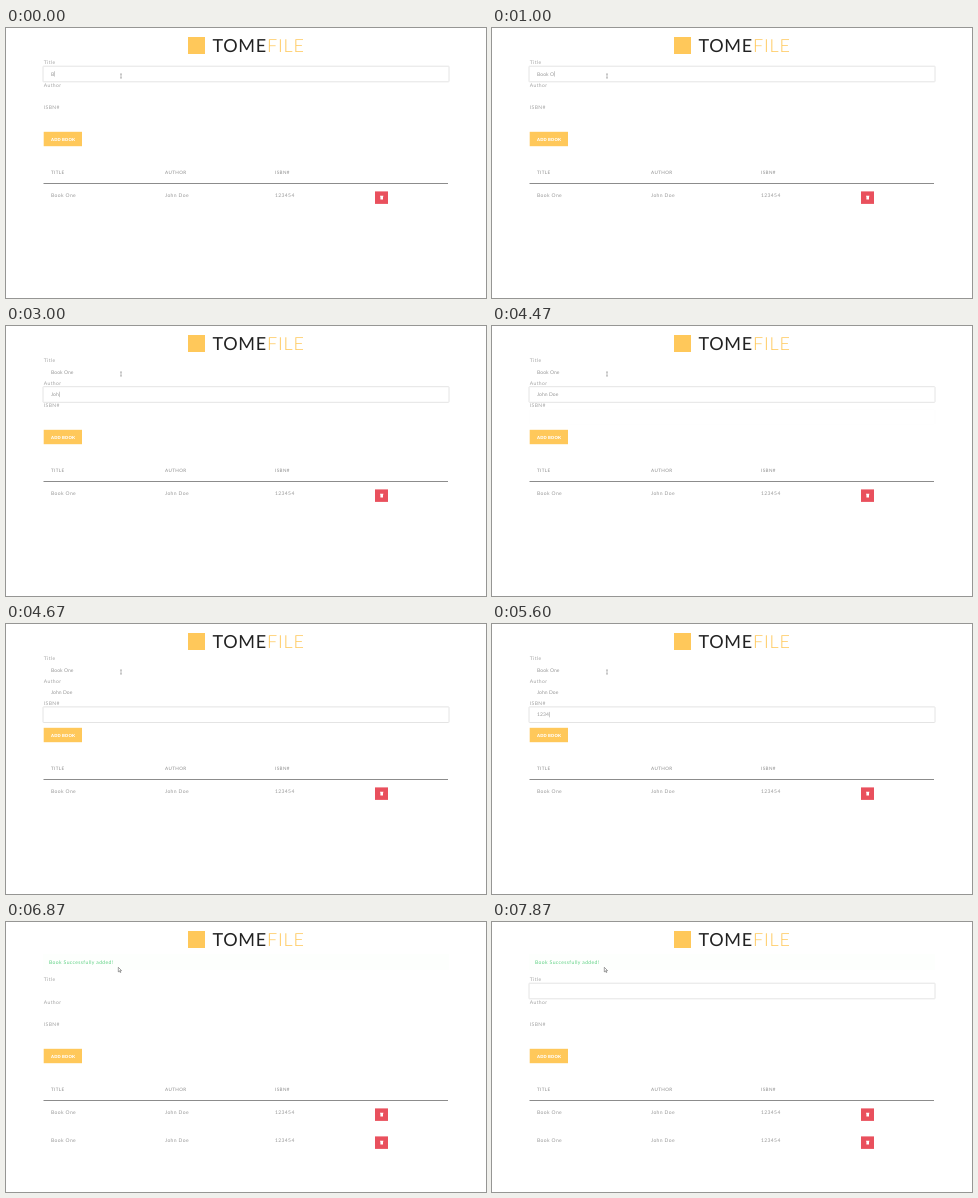
These frames come from a looping animation (480 by 270 pixels, 8000 ms). An HTML page:

```html
<!DOCTYPE html>
<html lang="en">
<head>
<meta charset="utf-8">
<title>Reading list form</title>
<style>
  html, body { margin: 0; width: 100%; height: 100%; overflow: hidden; background: #fff; }
  svg { display: block; width: 100vw; height: 100vh; }
  text {
    font: 400 5px Lato, "Open Sans", sans-serif;
    letter-spacing: .38px;
    fill: #989898;
    text-rendering: geometricPrecision;
    white-space: pre;
  }
  .brand { font-size: 18px; letter-spacing: .7px; fill: #222; }
  .brand tspan { font-weight: 300; letter-spacing: .9px; }
  .brand tspan, .amber { fill: #ffc85a; }
  .label { fill: #a2a2a2; }
  .value { letter-spacing: .06px; }
  .head { font-size: 4.6px; fill: #8c8c8c; }
  .action { font-size: 4.2px; font-weight: 900; letter-spacing: .15px; fill: #fff; }
  .notice { fill: #5bd080; }
  .focus { fill: #fff; stroke: #e4e4e4; }
  .rule { stroke: #8c8c8c; }
</style>
</head>
<body>
<svg viewBox="0 0 480 270">
  <rect class="amber" x="182" y="9" width="17" height="17"/>
  <text class="brand" x="206.5" y="24">TOME<tspan>FILE</tspan></text>
  <g id="notice">
    <rect x="37" y="32" width="406" height="16" fill="#fdfffd"/>
    <text class="notice" x="43" y="41.8">Book Successfully added!</text>
  </g>
  <g id="page"></g>
  <path id="beam" d="M114 46h2M115 46v4M114 50h2" fill="none" stroke="#a0a0a0" stroke-width=".7"/>
  <path id="arrow" d="M112.3 45.3v4.6l1.1-1 .8 1.7.7-.4-.8-1.6h1.5z" fill="#fff" stroke="#666" stroke-width=".6"/>
</svg>
<script>
const LOOP = 8000, SUBMIT = 6870, SHIFT = 23, FADE = 200, BLINK = 530;
const COLUMNS = [45, 159, 269];

// focus: [start, end, fade-out time]; keys: time at which each character appears
const FIELDS = [
  { label: 'Title', y: 38.2, text: 'Book One', focus: [[-FADE, 2000, FADE], [6930, LOOP, FADE]],
    keys: [0, 200, 330, 530, 670, 1000, 1330, 1400] },
  { label: 'Author', y: 60.7, text: 'John Doe', focus: [[2000, 4470, FADE]],
    keys: [2600, 2800, 3000, 3270, 3670, 3670, 3870, 4070] },
  { label: 'ISBN#', y: 82.9, text: '123454', focus: [[4470, SUBMIT, 1]],
    keys: [4930, 5000, 5070, 5600, 5670, 6000] }
];

const byId = id => document.getElementById(id);
const page = byId('page');

function add(parent, tag, attrs, content = '') {
  const node = document.createElementNS('http://www.w3.org/2000/svg', tag);
  for (const name in attrs) node.setAttribute(name, attrs[name]);
  node.textContent = content;
  return parent.appendChild(node);
}

function addRow(y) {
  const row = add(page, 'g', {});
  ['Book One', 'John Doe', '123454'].forEach((value, i) =>
    add(row, 'text', { x: COLUMNS[i], y: y + 1.8 }, value));
  add(row, 'rect', { x: 369, y: y - 3.6, width: 13, height: 12.5, fill: '#e9505d' });
  add(row, 'path', { d: `M374 ${y + .8}h3.4v.7h-.4v3h-2.6v-3h-.4z`, fill: '#fff' });
  return row;
}

for (const field of FIELDS) {
  field.box = add(page, 'rect', { class: 'focus', x: 37, y: field.y, width: 406, height: 15.6, rx: .5 });
  add(page, 'text', { class: 'label', x: 37.8, y: field.y - 2 }, field.label);
  field.value = add(page, 'text', { class: 'value', x: 45, y: field.y + 9.3 });
  field.caret = add(page, 'rect', { y: field.y + 5, width: .5, height: 5.4, fill: '#999' });
}

add(page, 'rect', { class: 'amber', x: 37.7, y: 103.8, width: 38.3, height: 14.4 });
add(page, 'text', { class: 'action', x: 45, y: 112.5 }, 'ADD BOOK');
['TITLE', 'AUTHOR', 'ISBN#'].forEach((name, i) =>
  add(page, 'text', { class: 'head', x: COLUMNS[i], y: 145.8 }, name));
add(page, 'path', { class: 'rule', d: 'M37.5 155.5H442' });
addRow(167);
const newRow = addRow(195);

const clamp = v => Math.max(0, Math.min(1, v));
const show = (node, on) => node.setAttribute('visibility', on ? 'visible' : 'hidden');

function focusLevel(spans, t) {
  return Math.max(...spans.map(([start, end, fadeOut]) =>
    Math.min(clamp((t - start) / FADE), 1 - clamp((t - end) / fadeOut))));
}

function drawField({ box, value, caret, text, focus, keys }, t) {
  const done = t >= SUBMIT;
  const typed = keys.filter(k => k <= t);
  box.setAttribute('opacity', done && t < SUBMIT + 1 ? 0 : focusLevel(focus, t));
  value.textContent = done ? '' : text.slice(0, typed.length);

  const active = focus.some(([start, end]) => t >= start && t < end);
  const blinkOn = Math.floor((t - typed.at(-1)) / BLINK) % 2 === 0;
  show(caret, active && !done && blinkOn);
  caret.setAttribute('x', 45.2 + value.getComputedTextLength());
}

function draw(t) {
  const done = t >= SUBMIT;
  for (const field of FIELDS) drawField(field, t);
  page.setAttribute('transform', `translate(0 ${done ? SHIFT : 0})`);
  show(byId('notice'), done);
  show(newRow, done);
  show(byId('arrow'), done);
  show(byId('beam'), !done);
}

const begin = performance.now();
function tick() {
  draw((performance.now() - begin) % LOOP);
  requestAnimationFrame(tick);
}
tick();
</script>
</body>
</html>
```
